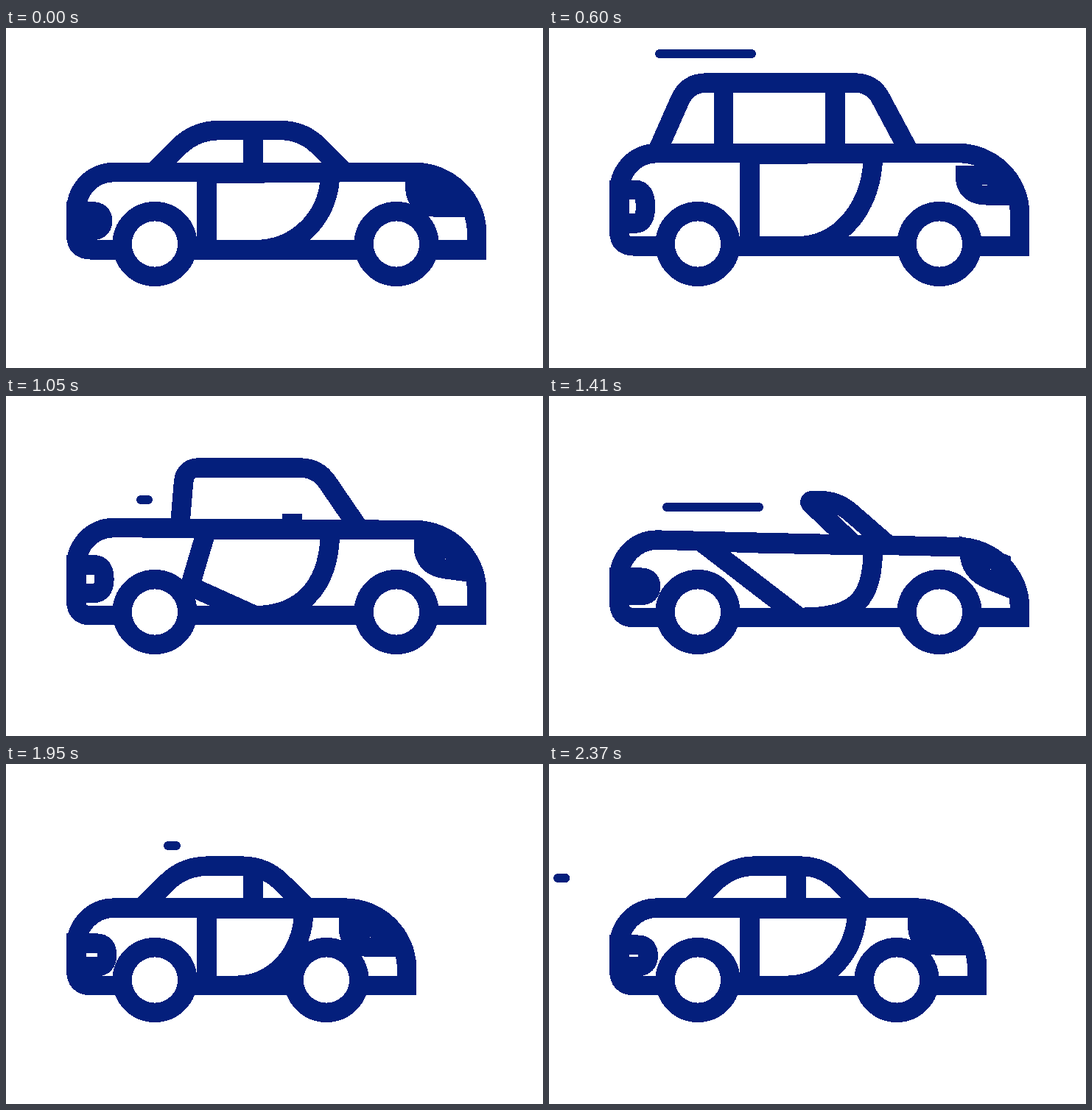
An HTML page that plays this animation: 729x462 px, repeating every 2.4 s.

```html
<!DOCTYPE html>
<html lang="en">
<head>
<meta charset="utf-8">
<title>Morphing car</title>
<style>
  html, body { margin: 0; width: 100%; height: 100%; overflow: hidden; background: #fff; }
  svg { display: block; width: 729px; height: 462px; shape-rendering: crispEdges;
        fill: none; stroke: #041f7c; stroke-width: 26.5; }
  #roof { stroke-linejoin: round; }
  #door { stroke-linejoin: bevel; }
  #streaks { stroke-width: 12; stroke-linecap: round; }
  circle { fill: #fff; }
</style>
</head>
<body>
<svg viewBox="0 0 729 462">
  <path id="streaks"/>
  <g id="shell">
    <path id="roof"/>
    <path id="pillars"/>
    <path id="door"/>
    <path id="tail"/>
    <path id="head"/>
    <path id="body"/>
  </g>
  <circle cx="202" cy="293.5" r="44.3"/>
  <circle id="wheel" cy="293.5" r="44.3"/>
</svg>
<script>
const FRAME = 30, FRAMES = 80, FLOOR = 301.3;

const sedan = {
  hood: 196, droop: 0, right: 639,
  roof: 139, rearFoot: 200, rearTop: 257, frontTop: 403, frontFoot: 460, rearCut: 33, frontCut: 31,
  rearPillar: 335.5, frontPillar: 335.5, pillarDrop: 0,
  doorBottom: 337, doorRight: 440, doorFold: 0,
  tailY: 262.2, tailHalf: 12.8, tailRight: 131,
  headInset: 83.5, headY: 216.3, headSlope: 0
};
const wagon = {
  ...sedan, hood: 175,
  roof: 79.5, rearFoot: 146, rearTop: 188, frontTop: 439, frontFoot: 490, rearCut: 26, frontCut: 24,
  rearPillar: 237, frontPillar: 388.5,
  tailY: 247.8, tailHalf: 22.8, headInset: 74, headY: 205.2
};
const roadster = {
  ...wagon, hood: 196, droop: 9.5,
  roof: 142.5, rearFoot: 414, rearTop: 351, frontTop: 391, frontFoot: 461, rearCut: 8,
  pillarDrop: 186, doorBottom: 340, doorFold: 1,
  tailY: 259.2, tailHalf: 12.2, tailRight: 138, headInset: 68.5, headY: 210, headSlope: .4
};
const compact = {
  ...sedan, right: 544,
  rearFoot: 184, rearTop: 241, frontTop: 351, frontFoot: 410,
  doorBottom: 312, doorRight: 404.5,
  tailY: 259.8, tailHalf: 15.8, tailRight: 137, headInset: 79, headY: 222
};
const poses = [sedan, wagon, roadster, compact, sedan];
const morphCentres = [12.96, 35.57, 57.4, 79.36], MORPH = 12;

// left x, y, first frame
const streaks = [[48, 105, 5.9], [150, 35, 13.8], [68, 141, 34.52],
                 [160, 151, 40.8], [106, 111, 64.47], [12, 155, 67.1]];
const LENGTH = 125, GROW = 6, HOLD = .4;

const clamp = x => Math.min(1, Math.max(0, x));
const lerp = (a, b, t) => a + (b - a) * t;
const ease = x => x < .5 ? 8 * x ** 4 : 1 - 8 * (1 - x) ** 4;
const $ = id => document.getElementById(id);
const draw = (id, d) => $(id).setAttribute('d', d);

function poseAt(frame) {
  const p = morphCentres.reduce((sum, c) => sum + ease(clamp((frame - c) / MORPH + .5)), 0);
  const i = Math.min(3, Math.floor(p)), pose = {};
  for (const key in sedan) pose[key] = lerp(poses[i][key], poses[i + 1][key], p - i);
  return pose;
}

// Point at a given distance from a towards b
function toward([ax, ay], [bx, by], distance) {
  const t = distance / Math.hypot(bx - ax, by - ay);
  return [lerp(ax, bx, t), lerp(ay, by, t)];
}

const roundCorner = (before, corner, after, cut) =>
  `L${toward(corner, before, cut)}Q${corner} ${toward(corner, after, cut)}`;

function drawCar(c) {
  const bend = c.right - 84, noseY = c.hood + c.droop;
  const hoodY = x => c.hood + c.droop * (x - 147) / (bend - 147);
  draw('body', `M${c.right},${FLOOR}V${noseY + 82}C${c.right},${noseY + 37} ${bend + 46},${noseY} ${bend},${noseY}
    L147,${c.hood}c-29,0 -51.7,23 -51.7,52V281.5Q95.3,${FLOOR} 115,${FLOOR}Z`);

  const rearFoot = [c.rearFoot, hoodY(c.rearFoot)], frontFoot = [c.frontFoot, hoodY(c.frontFoot)];
  const rearTop = [c.rearTop, c.roof], frontTop = [c.frontTop, c.roof];
  draw('roof', `M${rearFoot}${roundCorner(rearFoot, rearTop, frontTop, c.rearCut)}
    ${roundCorner(rearTop, frontTop, frontFoot, c.frontCut)}L${frontFoot}`);

  draw('pillars', [c.rearPillar, c.frontPillar].map(x =>
    `M${x},${hoodY(x)}V${Math.min(c.roof + c.pillarDrop, hoodY(x))}`).join(''));

  // The lower rear door corner folds up onto the hood line
  const doorTop = hoodY(c.doorRight) + 1, round = .57 + .2 * c.doorFold;
  draw('door', `M272.5,${hoodY(272) + 1.5}
    L${lerp(272.5, 205, c.doorFold)},${lerp(FLOOR, hoodY(205), c.doorFold)}L${c.doorBottom},${FLOOR}
    C${lerp(c.doorBottom, c.doorRight, round)},${FLOOR}
    ${c.doorRight},${lerp(doorTop, FLOOR, round)} ${c.doorRight},${doorTop}Z`);

  const top = c.tailY - c.tailHalf, bottom = c.tailY + c.tailHalf, flat = c.tailRight - 14;
  draw('tail', `M82,${top}H${flat}Q${c.tailRight},${top} ${c.tailRight},${c.tailY}
    Q${c.tailRight},${bottom} ${flat},${bottom}H95`);

  const left = c.right - c.headInset, gap = 27.2 * Math.hypot(1, c.headSlope);
  const upper = x => [left + x, c.headY + c.headSlope * x];
  const lower = x => [left + x, c.headY + c.headSlope * x + gap];
  draw('head', `M${lower(43)}L${upper(43)}L${upper(0)}Q${lower(0)} ${lower(30)}L${lower(c.headInset)}`);

  $('wheel').setAttribute('cx', c.right - 109);
}

function drawStreaks(frame) {
  draw('streaks', streaks.map(([x, y, start]) => {
    const age = frame - start;
    if (age <= 0 || age >= 2 * GROW + HOLD) return '';
    const from = x + LENGTH * (1 - clamp(age / GROW));
    const to = x + LENGTH * (1 - clamp((age - GROW - HOLD) / GROW));
    return `M${from},${y}H${to}`;
  }).join(''));
}

function render(now) {
  const frame = Math.floor(now / FRAME + .01) % FRAMES;
  const bounce = -5 * (1 - Math.cos(frame * Math.PI / 8));
  $('shell').setAttribute('transform', `translate(0 ${bounce})`);
  drawCar(poseAt(frame));
  drawStreaks(frame);
}

function tick() {
  render(performance.now());
  requestAnimationFrame(tick);
}
render(0);
requestAnimationFrame(tick);
</script>
</body>
</html>
```
